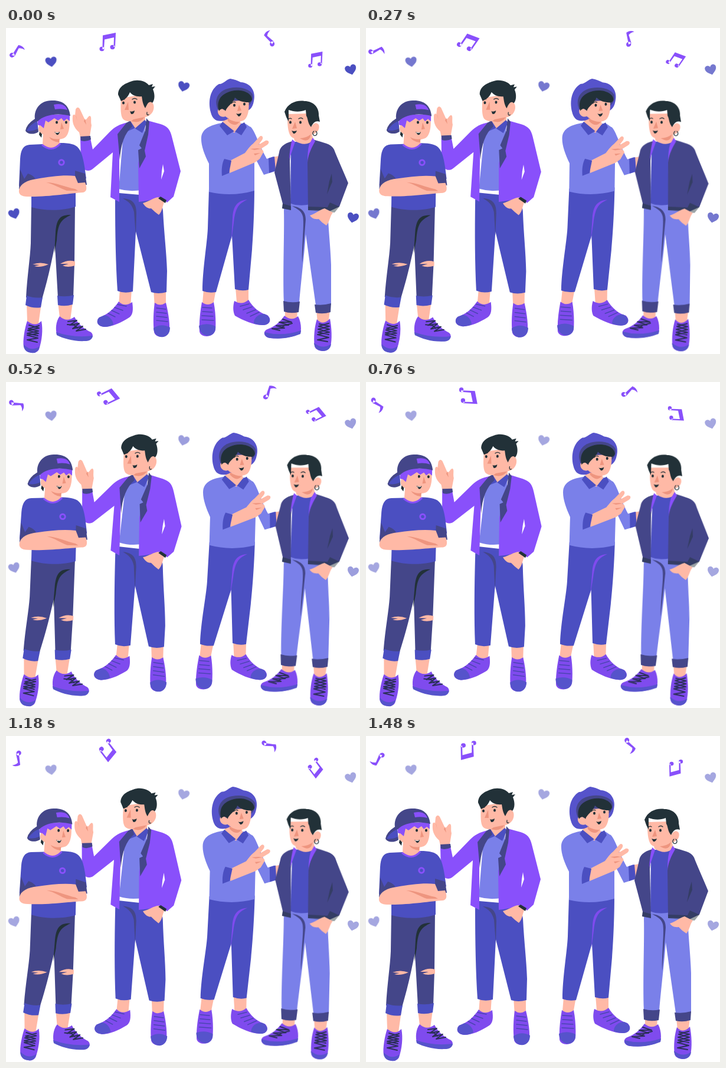
These frames come from a looping animation (600x553 px, 1.51 s). An HTML page:

```html
<!DOCTYPE html>
<html lang="en">
<head>
<meta charset="utf-8">
<title>Four friends</title>
<style>
html,body{margin:0;width:100%;height:100%;overflow:hidden;background:#fff}
svg{display:block;width:100%;height:100%}
.b{fill:#4b4fc1}.l{fill:#7a80e9}.n{fill:#444689}.v{fill:#8950fb}.p{fill:#7f4bee}
.s{fill:#ffb9a6}.r{fill:#ee957f}.d{fill:#223138}.w{fill:#fff}.t{fill:#5653cb}
.k{fill:none;stroke:#2b2f58;stroke-width:2;stroke-linecap:round;stroke-linejoin:round}
.q{fill:none;stroke:#4a45b0;stroke-width:1.5;stroke-linecap:round}
.h{fill:none;stroke:#223138;stroke-width:1.3;stroke-linecap:round}
.c{fill:none;stroke:#8950fb;stroke-width:3}
</style>
</head>
<body>
<svg viewBox="0 0 600 553" preserveAspectRatio="none">
<g id="hearts"></g>
<g id="notes"></g>

<g class="fig" data-x="222">
  <path class="s" d="M193 443H213L211 474Q200 480 191 470ZM250 443H271V474H252Z"/>
  <path class="b" d="M192 280L262 286L266 310C268 350 272 380 273 412L272 448Q258 452 246 448L220 345L215 447Q201 451 189 446C186 400 185 350 185 292Z"/>
  <path class="n" d="M198 289C214 290 221 297 221 314L220 352L217 312C214 299 207 294 198 289Z"/>
  <path class="p" d="M191 464Q201 474 214 465C216 478 215 487 209 491C195 500 180 507 167 507C154 506 152 497 158 491C173 486 183 476 191 464Z"/>
  <path class="t" d="M167 487C175 488 181 495 182 503Q174 507 167 507C154 506 152 497 158 491Z"/>
  <path class="q" d="M173 484L185 490M179 479L192 485M184 474L198 479M189 469L204 472"/>
  <path class="p" d="M252 466Q261 473 271 466C274 478 278 498 277 513C275 527 254 527 251 516C249 500 250 480 252 466Z"/>
  <path class="t" d="M250 509Q263 500 278 508C278 530 251 529 250 509Z"/>
  <path class="q" d="M255 475L271 477M255 482L272 484M255 489L273 491M255 496L274 498"/>
  <path class="s" d="M127 190L124 177C114 168 112 160 113 149Q115 145 117 148L118 138Q121 132 125 137L133 154C136 159 138 150 142 149C146 150 143 158 145 165L141 190Z"/>
  <path class="r" d="M118 148L121 158L119 150ZM134 154L136 164L132 158Z"/>
  <path class="l" d="M200 165L236 160L232 274Q212 279 191 273Z"/>
  <path class="s" d="M210 148L236 145V161L219 171L211 164Z"/>
  <path class="b" d="M211 158L202 165L204 176L218 170L231 178L239 160L235 156L219 170Z"/>
  <path class="v" d="M207 160C192 163 184 168 176 176L147 206L143 187L126 187L127 229C129 242 140 245 147 239L181 211L177 287L192 295L192 200Z"/>
  <path class="n" d="M126 184L143 183L144 189Q135 194 127 191ZM211 157L204 161L189 180L193 224C194 198 201 178 214 167Z"/>
  <path class="v" d="M240 157L262 163C274 167 278 172 281 184L296 243L284 286L273 296L262 287Q244 293 225 295L224 230Z"/>
  <path class="w" d="M266 231L268 243L263 257L264 243Z"/>
  <path class="n" d="M238 153L243 159L241 181L235 208L237 218L226 238L224 207L230 204L226 199L236 174Z"/>
  <path class="s" d="M232 297C243 294 250 288 258 287L270 292C265 299 266 310 259 317Q252 312 246 306C240 307 235 302 232 297Z"/>
  <path class="d" d="M262 286L272 292L270 297L258 289Z"/>
  <path class="s" d="M195 119C194 136 194 148 198 154C204 161 221 159 235 151C243 151 253 142 250 130C246 120 239 126 237 131L231 113Z"/>
  <path class="d" d="M190 113C190 99 203 94 211 91C223 86 237 90 242 97L249 95L247 100L253 99L249 104C253 113 252 123 248 127C242 122 239 130 236 136C231 128 231 120 230 116C221 117 214 114 210 109C207 117 201 122 195 124Z"/>
  <path class="r" d="M207 125L201 139L208 139ZM216 155L235 151Q227 163 212 158Z"/>
  <path class="d" d="M197 127a2 2.5 0 1 0 4 0a2 2.5 0 1 0-4 0M216 126a2 2.5 0 1 0 4 0a2 2.5 0 1 0-4 0M210 141Q213 143 218 140Q217 147 212 146Z"/>
  <path class="h" d="M195 122Q198 119 201 121M214 121Q218 118 222 121M239 143Q238 149 242 147"/>
</g>

<g class="fig" data-x="80">
  <path class="s" d="M35 467H60L55 502Q43 506 36 497ZM88 465H113L109 495Q100 499 91 491Z"/>
  <path class="n" d="M43 299L117 299L116 400L114 458H88L83 369C78 390 74 416 61 460L34 457C36 420 41 390 42 365Z"/>
  <path class="b" d="M35 454Q48 459 62 457L59 474Q45 476 33 470ZM87 454Q101 457 115 453L113 469Q100 473 88 470Z"/>
  <path class="d" d="M110 317C92 317 86 323 84 346L82 383L86 360C88 332 92 326 110 317Z"/>
  <path class="s" d="M45 401Q58 396 72 401Q58 407 48 404L57 402ZM92 400Q105 392 117 396V403Q104 407 96 403L106 400Z"/>
  <path class="p" d="M36 497C32 508 28 530 30 541C34 553 52 554 56 545C61 530 63 512 60 497Q50 508 36 497Z"/>
  <path class="t" d="M30 537Q43 550 57 540Q54 553 43 551Q30 550 30 537Z"/>
  <path class="k" d="M39 504L56 509L37 513L55 518L36 521L54 526L36 529L53 533M56 505L38 510L55 514L36 518L54 522"/>
  <path class="p" d="M91 489C84 498 84 512 86 519C99 527 120 532 138 530C148 528 149 520 144 516C133 511 122 502 116 490Q103 500 91 489Z"/>
  <path class="t" d="M85 516Q114 526 147 522C146 530 139 531 134 531C115 532 98 527 86 521Z"/>
  <path class="k" d="M105 498L120 496L108 504L124 501L113 510L130 506L119 514L135 511M104 503L116 504L121 509"/>
  <path class="b" d="M40 198C29 199 25 207 24 222L22 268L43 266V304C66 311 98 310 118 303V266L136 255C133 232 130 212 123 204C118 197 108 195 92 195Q78 207 62 197Z"/>
  <path class="n" d="M24 240L22 274C27 264 36 259 50 256Q45 249 37 247L31 256ZM117 242L117 254L120 268L137 266L134 247Z"/>
  <path class="s" d="M22 275C24 264 36 258 52 256C75 252 97 249 117 251L122 263L134 262C138 272 137 278 130 279C110 280 70 287 36 286C26 286 21 282 22 275Z"/>
  <path class="r" d="M68 262C85 262 101 270 117 273L122 276L103 276C91 272 82 265 68 262Z"/>
  <path class="s" d="M63 178L90 186L91 196C86 208 68 207 62 198Z"/>
  <path class="c" d="M61 198Q78 212 92 196"/>
  <circle class="c" cx="94" cy="228" r="4.2"/>
  <path class="s" d="M62 151H107C109 166 107 183 98 187C88 191 76 189 66 181C57 180 53 173 56 166C58 162 62 164 63 167Z"/>
  <path class="v" d="M52 148L108 146L108 158L103 154L98 158L94 153L88 157L82 153L72 160L67 157L64 170L58 165Q52 167 54 157Z"/>
  <path class="n" d="M49 154C47 138 58 123 77 123C96 122 107 131 109 149C89 144 65 146 53 159L55 176C47 182 35 180 33 174Q35 163 49 154Z"/>
  <path class="b" d="M53 158Q40 164 35 174Q43 176 54 171Z"/>
  <path class="v" d="M81 130C94 127 101 131 104 139Q94 136 83 138Z"/>
  <path class="r" d="M94 160L92 172L98 171ZM73 185Q82 190 91 188L90 194Q78 193 73 185Z"/>
  <path class="d" d="M84 160a2 2.5 0 1 0 4 0a2 2.5 0 1 0-4 0M100 160a2 2.5 0 1 0 4 0a2 2.5 0 1 0-4 0M82 176Q86 178 91 176Q90 182 86 181ZM57 176L61 180L60 186L56 181Z"/>
  <path class="w" d="M83 176.500Q86 178 90 176.500L89 178H84Z"/>
</g>

<g class="fig" data-x="385">
  <path class="s" d="M335 443H356L351 471Q342 475 333 467ZM389 440H411V466Q400 472 391 465ZM452 219L468 216V246L452 243Z"/>
  <path class="b" d="M344 273L421 270C421 310 419 350 417 376L411 444Q400 447 388 443L383 352L356 448Q343 450 333 446C333 410 341 365 342 340Z"/>
  <path class="p" d="M409 291C391 293 385 303 384 322L382 360L386 330C389 303 395 298 409 291Z"/>
  <path class="p" d="M332 465Q342 473 352 465C355 480 356 498 355 512C352 526 330 526 328 515C327 500 329 482 332 465Z"/>
  <path class="t" d="M327 505Q341 499 355 506C357 528 328 527 327 505Z"/>
  <path class="q" d="M333 474L349 475M333 481L350 482M332 488L351 489M332 495L352 496"/>
  <path class="p" d="M387 463Q400 471 411 461C418 473 430 484 443 487C451 494 448 504 435 504C420 504 402 496 388 488C384 480 385 470 387 463Z"/>
  <path class="t" d="M420 499C421 491 428 485 438 485C451 490 450 504 435 504Q428 504 420 501Z"/>
  <path class="q" d="M397 472L412 468M402 478L417 473M408 484L423 478M414 489L429 482"/>
  <path class="l" d="M402 162L415 168C422 175 427 194 442 222L453 218L456 243L437 249L419 214Z"/>
  <path class="b" d="M445 221L455 218L457 242L446 246Z"/>
  <path class="l" d="M366 161C345 165 333 171 331 185C330 198 336 214 344 230V278Q382 287 421 276V195C421 178 416 167 405 162Z"/>
  <path class="s" d="M367 152L396 155L398 163L387 178L368 162Z"/>
  <path class="b" d="M367 159L362 166L375 182L387 175L399 182L408 168L404 160L397 164L388 176Z"/>
  <path class="s" d="M378 226L405 212C411 204 414 200 419 196L430 184C434 181 437 186 434 190L428 198L440 191C446 190 447 195 443 198L432 205Q439 209 435 213L430 222L422 228L379 246Z"/>
  <path class="r" d="M414 205L426 204L432 205L421 207ZM420 213L431 212L422 216Z"/>
  <path class="b" d="M370 222L382 225L378 246L366 251C365 240 366 230 370 222Z"/>
  <path class="t" d="M361 95C367 96 374 87 380 86C387 87 392 89 398 92C415 93 424 108 420 124C418 137 411 140 406 142L370 157C357 160 350 155 347 143C342 124 346 104 361 95Z"/>
  <path class="n" d="M361 142C350 123 359 106 379 102C399 98 414 105 418 113Q420 124 411 132Z"/>
  <path class="s" d="M370 125L411 122C413 138 410 150 405 155C395 163 379 156 372 150C365 153 358 147 359 140C361 135 368 136 370 140Z"/>
  <path class="d" d="M361 141C356 123 364 112 382 107C398 103 416 109 417 121Q415 127 410 126C402 126 394 124 388 118C385 128 374 133 372 141C369 136 364 136 361 141Z"/>
  <path class="r" d="M395 130L392 141L399 140ZM375 153Q386 160 396 159Q388 170 376 158Z"/>
  <path class="d" d="M385 131a2 2.500 0 1 0 4 0a2 2.500 0 1 0-4 0M402 129a2 2.500 0 1 0 4 0a2 2.500 0 1 0-4 0M390 145Q394 147 399 144Q398 150 394 150Z"/>
  <path class="h" d="M382 128Q385 124 389 126"/>
</g>

<g class="fig" data-x="508">
  <path class="s" d="M473 477H494L493 496Q482 500 473 492ZM526 478H549L546 504Q537 508 528 499Z"/>
  <path class="l" d="M472 298L545 300C546 340 550 370 551 402V470H525L508 350C506 380 500 430 497 466H471C469 415 472 350 471 310Z"/>
  <path class="n" d="M485 302C499 304 508 310 508 325L502 398C501 370 506 331 503 319C500 309 493 307 485 302ZM470 463Q484 467 498 464L496 482Q482 485 471 481ZM523 469Q537 471 551 467L550 482Q537 486 525 483Z"/>
  <path class="p" d="M472 488Q484 498 495 489C500 498 501 510 499 518C485 525 465 528 448 526C437 525 434 515 443 511C455 507 464 499 472 488Z"/>
  <path class="t" d="M438 516Q468 524 500 513L499 519C482 526 465 528 448 526Q438 525 438 516Z"/>
  <path class="k" d="M469 494L484 499L463 499L479 504L458 505L472 509L451 510L464 513M485 501L474 504L467 508"/>
  <path class="p" d="M527 494Q537 506 549 493C552 508 553 528 550 540C546 551 526 550 523 540C521 525 523 506 527 494Z"/>
  <path class="t" d="M522 534Q536 546 551 536Q549 548 537 548Q523 547 522 534Z"/>
  <path class="k" d="M531 502L548 506L529 511L548 516L528 520L547 525L528 529L545 532M547 501L530 506L548 511L529 516L547 520"/>
  <path class="b" d="M483 193H522L516 299Q498 303 482 298Z"/>
  <path class="s" d="M486 178L518 177L521 190Q508 203 489 191Z"/>
  <path class="n" d="M485 192C470 196 464 203 463 211L455 245L469 298L468 306L483 309L481 225Z"/>
  <path class="n" d="M520 189C539 195 551 196 556 206C562 222 572 243 580 263L565 303L548 311Q531 308 512 309L511 224Z"/>
  <path class="v" d="M485 189L490 193L483 214L480 223Q481 204 485 189ZM520 186L524 192C518 203 512 214 511 228Q511 207 514 197Z"/>
  <path class="d" opacity=".45" d="M469 298L483 302V309L468 306ZM512 303L545 304L549 296L565 303L557 313L512 309ZM552 247L553 261L544 282L548 260Z"/>
  <path class="s" d="M515 318C525 315 530 309 540 306L554 313C549 319 549 328 543 335Q535 330 530 324C522 325 518 322 515 318Z"/>
  <path class="s" d="M478 146C476 162 478 178 483 184C491 192 509 188 517 180C526 181 533 172 530 164C525 158 520 163 518 167L511 145Z"/>
  <path class="d" d="M472 142C478 127 493 122 506 124C521 124 531 135 530 148L532 159C524 156 520 162 517 168C511 161 512 153 509 149L508 139C498 143 488 142 479 139L479 159L475 151Z"/>
  <path class="r" d="M490 159L485 171L493 170ZM498 187Q509 187 517 180Q514 197 498 187Z"/>
  <path class="d" d="M480 160a2 2.500 0 1 0 4 0a2 2.500 0 1 0-4 0M497 160a2 2.500 0 1 0 4 0a2 2.500 0 1 0-4 0M484 174Q488 176 493 174Q491 180 487 179Z"/>
  <path class="h" d="M478 155Q481 152 484 154M496 154Q500 151 503 154M522 175a3.500 4 0 1 0 3 0"/>
</g>
</svg>
<script>
const LOOP = 1510;
const el = id => document.getElementById(id);

const HEART = 'M0 9C-7 4-10 1-9.500-4C-8.500-9-2-9 0-4.500C2-9 8.500-9 9.500-4C10 1 7 4 0 9Z';
const SINGLE = 'M-9 6.500C-5 1-1-6 2-10.500C5-10 10-9 13-2.500Q7-6 2.500-5L-4 8Z' +
  'M-13 6.500a4.300 4 0 1 0 8.600 0a4.300 4 0 1 0-8.600 0';
const DOUBLE = 'M-9-11.500L13-16L12 8H9.500L10-8L-6-4.500L-7 12H-9.500Z' +
  'M-14.500 11.500a4 3.700 0 1 0 8 0a4 3.700 0 1 0-8 0M3.500 8.500a4 3.700 0 1 0 8 0a4 3.700 0 1 0-8 0';

const hearts = [[76.5, 57, -8], [301, 99, 14], [584.5, 70.500, -16], [14, 315, -18], [588, 321.5, 12]];
// x, y, start angle, scale, shape
const notes = [
  [19, 39.5, 0, 1, SINGLE], [173, 24, 0, 1, DOUBLE],
  [447, 17, -76, 1, SINGLE], [525, 54, 0, .88, DOUBLE]
];

el('hearts').innerHTML = hearts.map(([x, y, a]) =>
  `<path class="b" d="${HEART}" transform="translate(${x} ${y}) rotate(${a})"/>`).join('');
el('notes').innerHTML = notes.map(n => `<path class="v" d="${n[4]}"/>`).join('');

const noteEls = [...el('notes').children];
const figs = [...document.querySelectorAll('.fig')];

const ease = (t, a, b) => {
  const u = Math.min(1, Math.max(0, (t - a) / (b - a)));
  return (1 - Math.cos(Math.PI * u)) / 2;
};

function draw(t) {
  const lean = 1.6 * (ease(t, 0, 530) - ease(t, 1060, 1490));
  figs.forEach(f => f.setAttribute('transform', `rotate(${lean} ${f.dataset.x} 300)`));
  el('hearts').setAttribute('opacity', 1 - .5 * Math.min(1, t / 580));
  noteEls.forEach((e, i) => {
    const [x, y, a, k] = notes[i];
    e.setAttribute('transform', `translate(${x} ${y}) rotate(${a + 180 * t / LOOP}) scale(${k})`);
  });
}

const start = performance.now();
function tick() {
  draw((performance.now() - start) % LOOP);
  requestAnimationFrame(tick);
}
draw(0);
tick();
</script>
</body>
</html>
```
